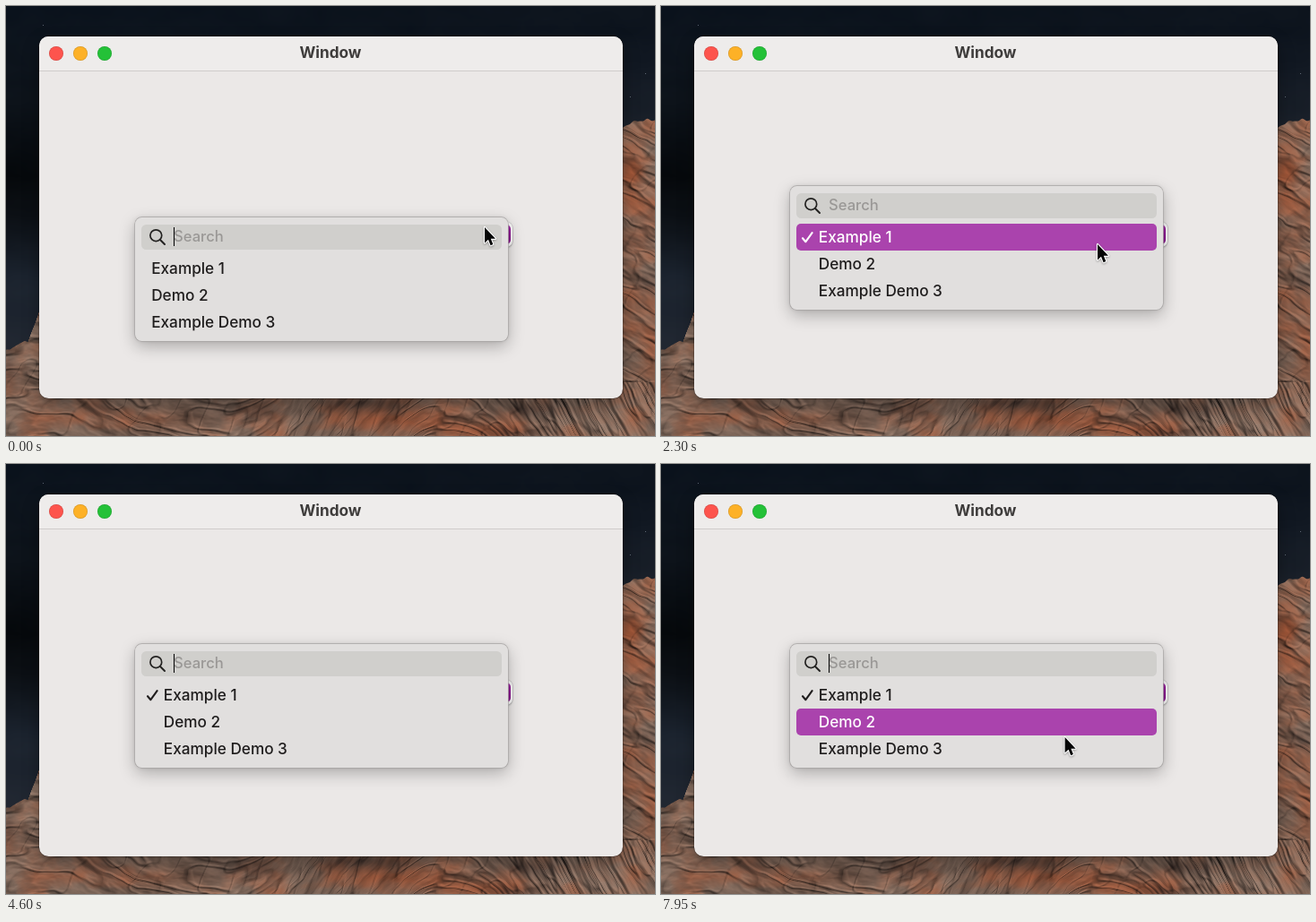
Write an HTML page with a canvas that moves like this. It is 724x480 px and loops after 8 s.

```html
<!DOCTYPE html>
<html lang="en">
<head>
<meta charset="utf-8">
<title>Searchable pop-up button</title>
<style>
html, body { margin: 0; width: 100%; height: 100%; overflow: hidden; background: #0b111c; }
#stage { position: relative; width: 724px; height: 480px; overflow: hidden;
  font: 450 17.2px/30px Inter, sans-serif; color: #1f1d1d; }
#stage * { position: absolute; box-sizing: border-box; white-space: pre; }
#wall { left: 0; top: 0; }
#win { left: 36.5px; top: 33.7px; width: 651px; height: 404.3px; border-radius: 10.5px; background: #ebe8e7;
  box-shadow: 0 0 1px .5px rgba(0,0,0,.4), 0 8px 18px rgba(0,0,0,.35); }
#bar { left: 0; top: 0; width: 651px; height: 39.3px; border-radius: 10.5px 10.5px 0 0;
  background: #eeeceb; border-bottom: 1px solid #cfcccb; }
#title { left: 0; right: 0; top: 3.3px; text-align: center; font-weight: 700; color: #3e3c3b; }
.light { top: 11.1px; width: 16px; height: 16px; border-radius: 50%; box-shadow: inset 0 0 0 .7px rgba(0,0,0,.14); }
#button { left: 158.5px; top: 241px; width: 406px; height: 27.5px; border-radius: 6.5px; background: #fdfcfc;
  box-shadow: 0 0 0 .6px rgba(0,0,0,.12), 0 1px 2px rgba(0,0,0,.28); }
#value { left: 11px; top: -1.5px; }
#chevrons { left: 382.2px; top: 2.7px; width: 22.3px; height: 22.3px; border-radius: 5px;
  background: linear-gradient(#9d22a2, #841389); }
#popup { left: 144px; width: 416px; border-radius: 7.5px; background: #e1dfde;
  box-shadow: 0 0 0 .7px #a9a6a5, 0 6px 18px rgba(0,0,0,.27), 0 0 4px rgba(0,0,0,.12); }
#field { left: 7px; top: 8px; width: 402px; height: 27.5px; border-radius: 5.5px; background: #d0cfcc;
  line-height: 27.5px; font-size: 16.6px; }
#glass { left: 8px; top: 4px; }
#query { left: 36px; top: 0; }
#caret { top: 3px; width: 1.4px; height: 21px; background: #000; }
#clear { left: 374px; top: 4.7px; }
.row { left: 6.5px; width: 402.5px; height: 30px; border-radius: 5px; }
.row.on { background: #aa43ad; color: #fff; }
.label { top: 0; }
.tick { left: 5px; top: 8px; }
#cursor, #ring { left: 0; top: 0; overflow: visible; }
#cursor { filter: drop-shadow(0 1px 1px rgba(0,0,0,.3)); }
</style>
</head>
<body>
<div id="stage">
  <canvas id="wall" width="724" height="480"></canvas>
  <div id="win">
    <div id="bar"></div>
    <div id="title">Window</div>
    <div class="light" style="left:11px;background:#fd544d"></div>
    <div class="light" style="left:38.2px;background:#fdb127"></div>
    <div class="light" style="left:65.5px;background:#24c138"></div>
  </div>
  <div id="button">
    <div id="value"></div>
    <svg id="chevrons" viewBox="0 0 22 22" fill="none" stroke="#fff" stroke-width="1.9" stroke-linecap="round" stroke-linejoin="round">
      <path d="M6.8 8.6 11 4.6l4.2 4M6.8 13.4l4.2 4 4.2-4"/>
    </svg>
  </div>
  <div id="popup">
    <div id="field">
      <svg id="glass" width="20" height="20" fill="none" stroke="#232221" stroke-linecap="round">
        <circle cx="8.3" cy="8.2" r="6.4" stroke-width="1.7"/>
        <path d="M13 13l5 5" stroke-width="2"/>
      </svg>
      <div id="query"></div>
      <div id="caret"></div>
      <svg id="clear" width="18" height="18">
        <circle cx="9" cy="9" r="8.9" fill="#222120"/>
        <path d="M6 6l6 6M12 6l-6 6" stroke="#dddcd9" stroke-width="1.5" stroke-linecap="round"/>
      </svg>
    </div>
  </div>
  <svg id="ring" width="62" height="62"><circle cx="31" cy="31" r="29.3" fill="none" stroke="#0c0c0c" stroke-width="2"/></svg>
  <svg id="cursor" width="16" height="24">
    <path d="M0 0V17.4L4 13.8 6.6 20.2 9.3 19 6.8 12.8H12Z" fill="#050505" stroke="#fff" stroke-width="2.2" stroke-linejoin="round" paint-order="stroke"/>
  </svg>
</div>
<script>
const LOOP = 8000;
const ITEMS = ['Example 1', 'Demo 2', 'Example Demo 3'];
const $ = id => document.getElementById(id);
const show = (el, on) => { el.style.display = on ? 'block' : 'none'; };
const smooth = u => u * u * (3 - 2 * u);
const clamp = u => Math.min(1, Math.max(0, u));
const mix = (a, b, u) => a.map((v, i) => v + (b[i] - v) * u);

// ---- desert wallpaper -------------------------------------------------
function hash(x, y) {
  let h = Math.imul(x, 374761393) + Math.imul(y, 668265263);
  h = Math.imul(h ^ (h >>> 13), 1274126177);
  return ((h ^ (h >>> 16)) >>> 0) / 4294967296;
}
function noise(x, y) {
  const i = Math.floor(x), j = Math.floor(y), u = smooth(x - i), v = smooth(y - j);
  const a = hash(i, j), b = hash(i + 1, j), c = hash(i, j + 1), d = hash(i + 1, j + 1);
  return (a + (b - a) * u) * (1 - v) + (c + (d - c) * u) * v;
}
function fbm(x, y) {
  let sum = 0;
  for (let k = 0, amp = .5; k < 4; k++, amp /= 2, x = x * 2 + 7, y = y * 2 + 3) sum += amp * noise(x, y);
  return sum;
}
function ramp(stops, p) {
  let k = 0;
  while (k < stops.length - 2 && p > stops[k + 1][0]) k++;
  const [a, c] = stops[k], [b, d] = stops[k + 1];
  return mix(c, d, clamp((p - a) / (b - a)));
}
const SKY_LEFT = [[0, [11, 19, 29]], [110, [13, 19, 26]], [190, [6, 9, 12]], [235, [11, 15, 20]], [300, [26, 34, 45]], [390, [34, 40, 50]]];
const SKY_RIGHT = [[0, [12, 19, 28]], [70, [17, 24, 34]], [140, [28, 34, 43]]];
// cx, cy, rx, ry, strength
const RED = [[455, 462, 75, 16, .8], [545, 474, 50, 10, .5], [696, 195, 15, 32, .75], [714, 240, 18, 20, .35],
  [694, 335, 16, 40, .45], [722, 385, 14, 45, .4], [165, 462, 60, 14, .4], [15, 425, 30, 20, .2]];
const DARK = [[395, 444, 45, 9, .6], [585, 450, 45, 9, .5], [270, 452, 50, 12, .4], [560, 476, 35, 7, .4],
  [700, 262, 30, 8, .35], [718, 308, 14, 12, .45], [100, 450, 30, 8, .25], [3, 405, 8, 14, .3]];
const blobs = (list, x, y) => list.reduce((s, [cx, cy, rx, ry, k]) =>
  s + k * Math.exp(-(((x - cx) / rx) ** 2) - ((y - cy) / ry) ** 2), 0);

function ridge(x) {
  if (x < 60) return 383 - .4 * x - 2.2 * Math.max(0, x - 24) + 4 * (noise(x * .25, 2) - .5);
  if (x > 660) return 125 + ((714 - x) / 9) ** 2 + 3 * noise(x * .2, 5);
  return 400;
}
// Stretched noise along the tilted beds, with a few irregular clefts.
function relief(x, y) {
  const tilt = x > 660 && y < 420 ? -.55 : .3 * Math.sin(x * .011 + 2.6);
  const bend = 26 * fbm(x * .014, y * .02);
  const bed = y + tilt * x + bend;
  const cleft = Math.abs(noise(x * .022, bed * .11) - .5) * 2;
  const facet = Math.abs(noise(x * .06 + bed * .03, bed * .05 + 30) - .5) * 2;
  return 1.1 * fbm(x * .035, bed * .09) + .5 * Math.min(1, cleft * 4) + .3 * Math.min(1, facet * 5);
}
function rock(x, y) {
  const h = relief(x, y);
  const slope = h - relief(x - 1.5, y + 2);
  const tone = fbm(x * .03 + 9, y * .05);
  const lit = clamp(.42 + .32 * h + .42 * slope + .3 * (tone - .5)) * 1.06;
  let c = mix([146, 120, 105], [152, 98, 74], clamp((tone - .38) * 2.5));
  c = mix(c, [166, 86, 54], clamp(blobs(RED, x, y) * (.5 + tone)));
  return mix(c.map(v => v * lit), [42, 33, 31], clamp(blobs(DARK, x, y) * (1.4 - .6 * h)));
}
function paintWall() {
  const ctx = $('wall').getContext('2d');
  const img = ctx.createImageData(724, 480);
  for (let y = 0; y < 480; y++) for (let x = 0; x < 724; x++) {
    if (x > 50 && x < 674 && y > 46 && y < 426) continue;
    const edge = clamp(y - ridge(x) + .5);
    const haze = 6 * (fbm(x * .02, y * .035) - .47);
    let c = mix(ramp(SKY_LEFT, y), ramp(SKY_RIGHT, y), smooth(x / 724)).map(v => v + haze);
    if (edge) c = mix(c, rock(x, y), edge);
    img.data.set([...c, 255], (y * 724 + x) * 4);
  }
  ctx.putImageData(img, 0, 0);
  ctx.fillStyle = 'rgba(190,200,215,.45)';
  [[41, 21], [713, 75], [696, 101]].forEach(([x, y]) => ctx.fillRect(x, y, 1, 1));
}

// ---- timeline ---------------------------------------------------------
const PATH = [[100, 534, 247], [650, 471, 291], [950, 471, 291], [1250, 487, 266], [7650, 487, 266], [8050, 444, 312]];
const CLICKS = [[880, 1030], [1260, 1420]];
const CLOSE = 1050, REOPEN = 1450;
const TYPING = [[2650, 'e'], [2800, 'ex'], [2950, 'exa'], [4250, 'ex'], [4400, 'e'], [4550, '']];
const BLINK = 550, LAG = 60;

function pointer(t) {
  let k = 0;
  while (k < PATH.length - 2 && t > PATH[k + 1][0]) k++;
  const [a, ...p] = PATH[k], [b, ...q] = PATH[k + 1];
  return mix(p, q, smooth(clamp((t - a) / (b - a))));
}

const rows = ITEMS.map(text => {
  const el = document.createElement('div');
  el.className = 'row';
  el.innerHTML = '<svg class="tick" width="16" height="15" fill="none" stroke="currentColor" stroke-width="2.1" ' +
    'stroke-linecap="round" stroke-linejoin="round"><path d="M2 8.2 5.4 12.2 12.6 2.2"/></svg><div class="label"></div>';
  el.lastChild.textContent = text;
  $('popup').append(el);
  return { el, text, tick: el.firstChild, label: el.lastChild };
});

function draw(t) {
  const chosen = t >= CLOSE;
  const open = !chosen || t >= REOPEN;
  const top = chosen ? 201 : 236;
  const key = TYPING.filter(k => k[0] <= t).pop();
  const query = key ? key[1] : '';
  const visible = t < TYPING[0][0] || t >= 7680;

  $('value').textContent = chosen ? ITEMS[0] : '';
  show($('popup'), open);
  $('popup').style.top = top + 'px';

  $('query').textContent = query || 'Search';
  $('query').style.color = query ? '#1f1d1d' : '#9a9896';
  show($('clear'), query);
  const since = key ? key[0] : chosen ? REOPEN : 0;
  show($('caret'), (t - since) % (2 * BLINK) < BLINK);
  $('caret').style.left = 36 + (query ? $('query').offsetWidth : 0) + 'px';

  const hoverY = pointer(t - LAG)[1] - top - 42;
  const hover = visible && hoverY >= 0 ? Math.floor(hoverY / 30) : -1;
  let n = 0;
  rows.forEach(({ el, text, tick, label }, i) => {
    const match = text.toLowerCase().includes(query);
    show(el, match);
    if (!match) return;
    el.style.top = 42 + 30 * n + 'px';
    el.classList.toggle('on', n === hover);
    label.style.left = (chosen ? 25.3 : 11.7) + 'px';
    show(tick, chosen && i === 0 && !query);
    n++;
  });
  $('popup').style.height = 48.3 + 30 * n + 'px';

  const [x, y] = pointer(t);
  show($('cursor'), visible);
  $('cursor').style.transform = `translate(${x}px,${y}px)`;
  show($('ring'), CLICKS.some(([a, b]) => t >= a && t < b));
  $('ring').style.transform = `translate(${x - 31}px,${y - 31}px)`;
}

paintWall();
draw(0);
const start = performance.now();
function tick() {
  draw((performance.now() - start) % LOOP);
  requestAnimationFrame(tick);
}
requestAnimationFrame(tick);
</script>
</body>
</html>
```
